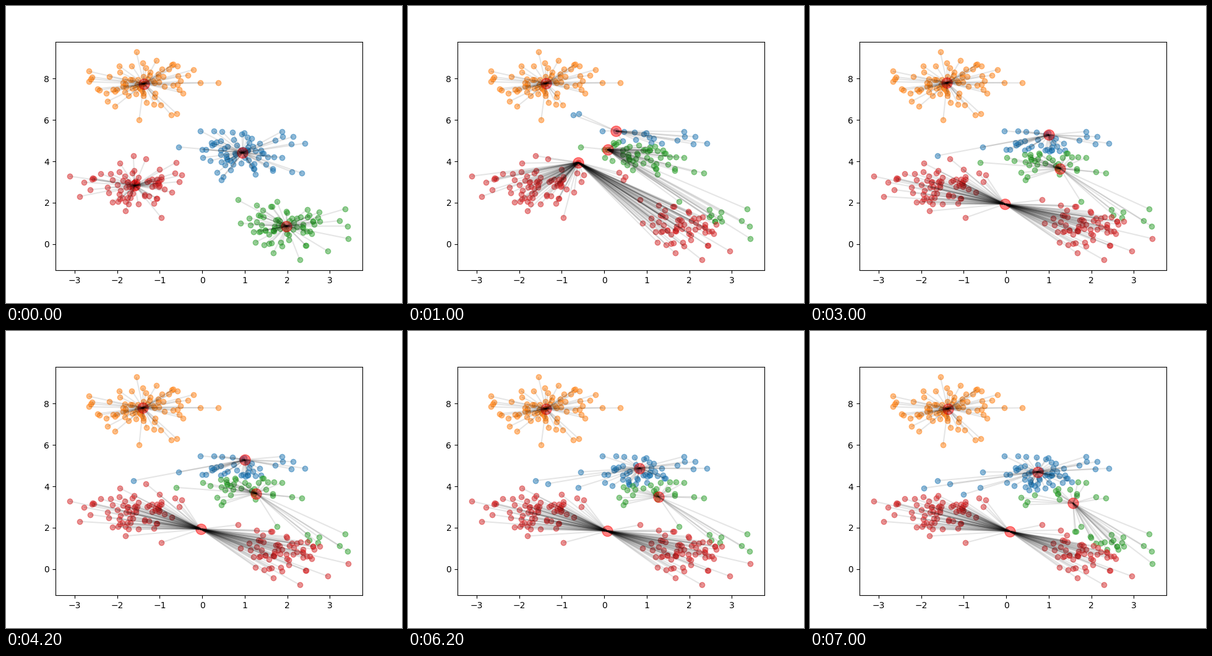
A matplotlib script for the animation above (8000 ms loop, 640 px wide and 480 px high).

```python
import numpy as np
import matplotlib.pyplot as plt
from matplotlib.animation import FuncAnimation
from matplotlib.collections import LineCollection

COLORS = ["tab:blue", "tab:orange", "tab:green", "tab:red"]
SEEDS = [(0.27, 5.47), (-1.37, 7.78), (0.08, 4.57), (-0.61, 3.95)]
# k-means step shown during each second; -1 is the converged state
STEPS = [-1, 0, 0, 1, 1, 2, 2, 3]


def make_blobs(count=300, std=0.6):
    rng = np.random.RandomState(0)
    middles = rng.uniform(-10, 10, size=(4, 2))
    blobs = [rng.normal(loc=m, scale=std, size=(count // 4, 2)) for m in middles]
    order = np.arange(count)
    rng.shuffle(order)
    return np.vstack(blobs)[order]


def nearest(a, b):
    """Index in b of the row closest to each row of a."""
    return np.linalg.norm(a[:, None] - b[None], axis=2).argmin(axis=1)


def k_means(points, centers):
    """Every (centers, labels) pair until the centers stop moving."""
    history = []
    while True:
        labels = nearest(points, centers)
        history.append((centers, labels))
        moved = np.array([points[labels == k].mean(axis=0)
                          for k in range(len(centers))])
        if np.allclose(moved, centers):
            return history
        centers = moved


points = make_blobs()
history = k_means(points, points[nearest(np.array(SEEDS), points)])

fig, ax = plt.subplots(figsize=(6.4, 4.8), dpi=100)


def draw(i):
    centers, labels = history[STEPS[i]]
    ax.clear()
    for k, color in enumerate(COLORS):
        ax.scatter(*points[labels == k].T, color=color, alpha=0.5)
    ax.scatter(*centers.T, color="red", s=150, alpha=0.5)
    spokes = np.stack([points, centers[labels]], axis=1)
    ax.add_collection(LineCollection(spokes, colors="black", linewidths=1.5,
                                     alpha=0.1, zorder=2), autolim=False)


anim = FuncAnimation(fig, draw, frames=len(STEPS), init_func=lambda: None,
                     interval=1000, repeat=True, repeat_delay=0)
plt.show()
```
